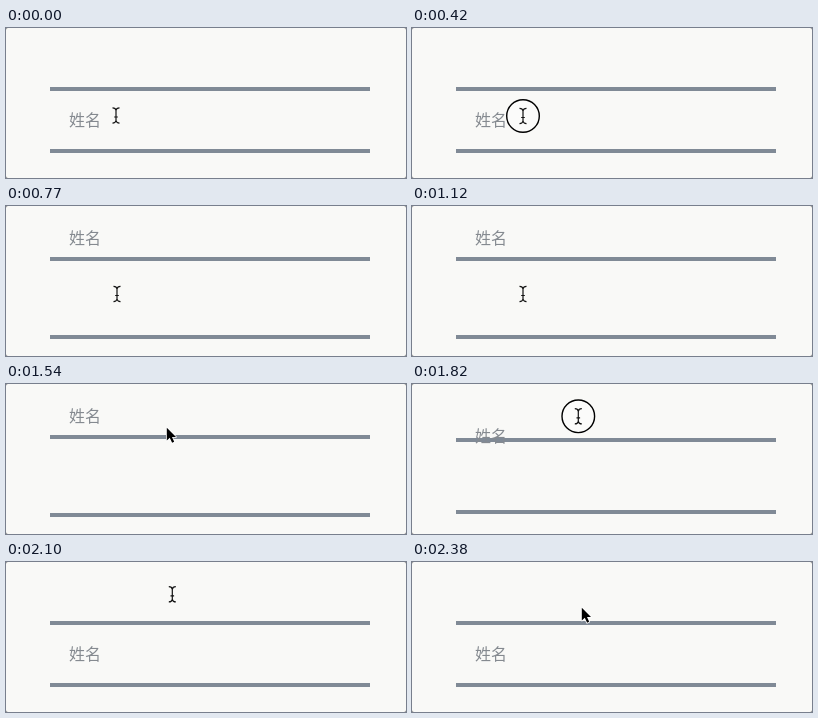
Animation, 400 px wide and 150 px high, one loop 2450 ms. Source, as an HTML page:

```html
<!DOCTYPE html>
<html lang="zh-CN">
<head>
<meta charset="utf-8">
<style>
  html, body { margin: 0; width: 100%; height: 100%; overflow: hidden; background: #777; }
  svg { display: block; width: 400px; height: 150px; }
  text { font: 500 16px "Noto Sans CJK SC", "Noto Sans CJK JP", "Noto Sans CJK", sans-serif; fill: #858a90; }
  .line { fill: #808a96; }
  #beam { fill: none; stroke: #111; stroke-width: 1.2; }
  #arrow { fill: #000; stroke: #fff; stroke-width: 1.6; paint-order: stroke; stroke-linejoin: round; }
  #ring { fill: #fbfbfa; stroke: #000; stroke-width: 1.4; }
</style>
</head>
<body>
<svg viewBox="0 0 400 150">
  <rect width="400" height="150" rx="2" fill="#f9f9f7"/>
  <rect id="top" class="line" x="44" width="320" height="4"/>
  <rect id="bottom" class="line" x="44" width="320" height="4"/>
  <text id="label" x="63">姓名</text>
  <g id="cursor">
    <circle id="ring" r="16.3"/>
    <path id="beam" d="M-3.5-7.6Q-.4-7.6 0-5Q.4-7.6 3.5-7.6M0-5V5M-3.5 7.6Q-.4 7.6 0 5Q.4 7.6 3.5 7.6M-1.8 1.5H1.8"/>
    <path id="arrow" d="M.8.8V13.6L3.8 10.8 6.1 15.8 8.2 14.8 6 10H10Z"/>
  </g>
</svg>
<script>
const LOOP = 2450, STEP = 70, DURATION = 300;
const FOCUS = 455, BLUR = 1755;
const el = id => document.getElementById(id);
const lerp = (a, b, p) => a + (b - a) * p;
const clamp = p => Math.min(1, Math.max(0, p));
const within = (t, from, to) => t >= from && t < to;
const show = (id, on) => el(id).style.display = on ? "" : "none";

// [time, x, y] of the pointer's hot spot
const path = [
  [0, 110, 87.5], [140, 111, 88], [1330, 111, 88], [1400, 126, 72],
  [1470, 146, 54], [1540, 160, 43], [1610, 165, 35], [1680, 166.3, 32.3],
  [2100, 166.3, 32.3], [2380, 169, 45]
];

function pointerAt(t) {
  const next = path.findIndex(key => key[0] > t);
  if (next < 0) return path[path.length - 1].slice(1);
  const [a, b] = [path[next - 1], path[next]];
  const p = (t - a[0]) / (b[0] - a[0]);
  return [lerp(a[1], b[1], p), lerp(a[2], b[2], p)];
}

// CSS "ease": cubic-bezier(.25, .1, .25, 1)
function ease(x) {
  const bezier = (u, a, b) => 3 * u * (1 - u) ** 2 * a + 3 * u * u * (1 - u) * b + u ** 3;
  let low = 0, high = 1;
  for (let i = 0; i < 20; i++) {
    const mid = (low + high) / 2;
    if (bezier(mid, .25, .25) < x) low = mid; else high = mid;
  }
  return bezier(high, .1, 1);
}

const progress = (t, start) => {
  const p = clamp((t - start) / DURATION);
  return p === 0 || p === 1 ? p : ease(p);
};

function draw(time) {
  const t = Math.floor(time % LOOP / STEP) * STEP;
  const open = progress(t, FOCUS) - progress(t, BLUR);
  el("top").setAttribute("y", Math.round(lerp(59, 51, open)));
  el("bottom").setAttribute("y", Math.round(lerp(121, 129, open)));
  el("label").setAttribute("y", lerp(98, 38, open));

  const isArrow = within(t, 1540, 1610) || t >= 2170;
  el("cursor").setAttribute("transform", `translate(${pointerAt(t)})`);
  show("arrow", isArrow);
  show("beam", !isArrow);
  show("ring", within(t, 350, 560) || within(t, 1680, 1890));
}

const start = performance.now();
function tick() {
  draw(performance.now() - start);
  requestAnimationFrame(tick);
}
tick();
</script>
</body>
</html>
```
